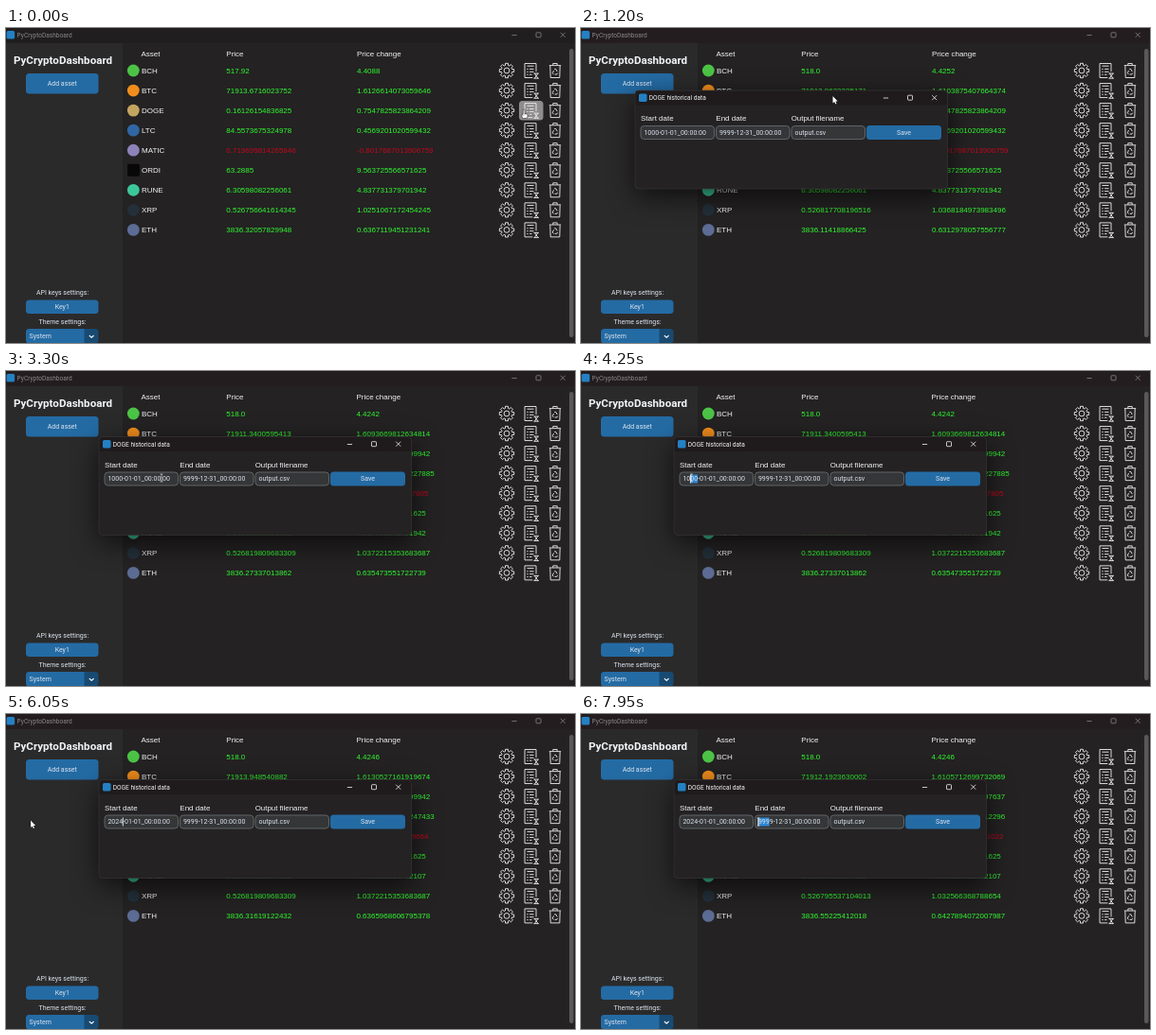
Animation, 600 px wide and 333 px high, one loop 8 s. Source, as an HTML page with a canvas:

```html
<!DOCTYPE html>
<html lang="en">
<head>
<meta charset="utf-8">
<title>PyCryptoDashboard</title>
<style>
html, body { margin: 0; width: 100%; height: 100%; overflow: hidden; background: #242223; }
canvas { display: block; width: 600px; height: 333px; }
</style>
</head>
<body>
<canvas id="stage"></canvas>
<script>
const W = 600, H = 333, LOOP = 8000;
const canvas = document.getElementById('stage');
const ctx = canvas.getContext('2d');
const dpr = Math.max(1, window.devicePixelRatio || 1);
canvas.width = W * dpr;
canvas.height = H * dpr;

const UI = 'Roboto, sans-serif';
const TABLE = '"Liberation Sans", Arial, sans-serif';
const BLUE = '#246ba4', WHITE = '#f2f4f6', GREEN = '#30fa30', RED = '#c0081c', DIM = '#8a8687';

// Each value is a list of [start time, text].
const ROWS = [
  { name: 'BCH', icon: '#4cc346',
    price: [[0, '517.92'], [700, '518.0']],
    change: [[0, '4.4088'], [700, '4.4252'], [2700, '4.4242'], [4300, '4.4246']] },
  { name: 'BTC', icon: '#f08d1c',
    price: [[0, '71913.6716023752'], [700, '71912.9623235171'], [1600, '71914.6614225621'],
      [2700, '71911.3400595413'], [4300, '71913.948540882'], [6200, '71913.9502232142'], [7400, '71912.1923630002']],
    change: [[0, '1.6126614073059646'], [700, '1.6103875407664374'], [1600, '1.614060004558271'],
      [2700, '1.6093669812634814'], [4300, '1.6130527161919674'], [6200, '1.613055093295621'], [7400, '1.6105712699732069']] },
  { name: 'DOGE', icon: '#c4a560',
    price: [[0, '0.16126154836825']],
    change: [[0, '0.7547825823864209'], [1600, '0.7541078523099942'], [7400, '0.7529163840297637']] },
  { name: 'LTC', icon: '#2f66a3',
    price: [[0, '84.5573675324978']],
    change: [[0, '0.4569201020599432'], [2700, '0.45702816340227885'], [4300, '0.45713902615247433'],
      [6200, '0.45724018362320926'], [7400, '0.4571860253912296']] },
  { name: 'MATIC', icon: '#8d83b8', down: true,
    price: [[0, '0.719699814265846']],
    change: [[0, '-0.8017687013906759'], [2700, '-0.801620438197805'], [4300, '-0.801573926499664'],
      [6200, '-0.801468135023621'], [7400, '-0.801530274681022']] },
  { name: 'ORDI', icon: '#080808', square: true,
    price: [[0, '63.2885']], change: [[0, '9.563725566571625']] },
  { name: 'RUNE', icon: '#3cc79a',
    price: [[0, '6.30598082256061'], [4300, '6.30606535104182']],
    change: [[0, '4.837731379701942'], [4300, '4.839123016702107']] },
  { name: 'XRP', icon: '#23303a',
    price: [[0, '0.526756641614345'], [700, '0.526817708196516'], [2700, '0.526819809683309'],
      [6200, '0.526819809615527'], [7400, '0.526795537104013']],
    change: [[0, '1.0251067172454245'], [700, '1.0368184973983496'], [2700, '1.0372215353683687'],
      [6200, '1.037221522368658'], [7400, '1.032566368788654']] },
  { name: 'ETH', icon: '#5c6c94',
    price: [[0, '3836.32057829948'], [700, '3836.11418866425'], [1600, '3836.19127218155'],
      [2700, '3836.27337013862'], [4300, '3836.31619122432'], [6200, '3836.4587764253'], [7400, '3836.55225412018']],
    change: [[0, '0.6367119451231241'], [700, '0.6312978057556777'], [1600, '0.633319907811002'],
      [2700, '0.635473551722739'], [4300, '0.6365968606795378'], [6200, '0.6403372430344039'], [7400, '0.6427894072007987']] }
];

const OPEN = 500;
const YEAR = [[0, '1000'], [5050, '2'], [5400, '20'], [5650, '202'], [5950, '2024']];
const POINTER = [[0, 546, 88], [480, 548, 88], [1000, 265.5, 72], [1200, 265.5, 72], [1550, 306.5, 75.5],
  [1900, 209, 118], [2300, 209, 118], [3000, 164, 113], [3500, 164, 113], [3950, 124, 113],
  [4150, 124, 113], [4750, 26, 112.5], [6100, 26, 112.5], [6650, 124, 113], [7100, 124, 113],
  [7500, 199, 114], [7650, 199, 114], [7900, 187, 114], [8000, 187, 114]];

const at = (steps, t) => steps.filter(s => s[0] <= t).pop()[1];
const ease = k => k * k * (3 - 2 * k);
const mix = (a, b, k) => a + (b - a) * k;

function follow(path, t) {
  const i = Math.max(1, path.findIndex(p => p[0] > t));
  const a = path[i - 1], b = path[i];
  const k = ease((t - a[0]) / (b[0] - a[0]));
  return { x: mix(a[1], b[1], k), y: mix(a[2], b[2], k) };
}

function text(str, x, y, size, font, color, align = 'left', weight = 400) {
  ctx.font = `${weight} ${size}px ${font}`;
  ctx.textAlign = align;
  ctx.fillStyle = color;
  ctx.fillText(str, x, y + size * 0.32);
}

function box(x, y, w, h, r, fill, stroke) {
  ctx.beginPath();
  ctx.roundRect(x, y, w, h, r);
  if (fill) { ctx.fillStyle = fill; ctx.fill(); }
  if (stroke) { ctx.strokeStyle = stroke; ctx.stroke(); }
}

function line(...pts) {
  ctx.beginPath();
  for (let i = 0; i < pts.length; i += 2) ctx.lineTo(pts[i], pts[i + 1]);
  ctx.stroke();
}

function button(label, x, y, w, h) {
  box(x, y, w, h, 3.5, BLUE);
  text(label, x + w / 2, y + h / 2, 7, UI, '#dce4ee', 'center');
}

function windowButtons(x, y, color) {
  ctx.strokeStyle = color;
  ctx.lineWidth = 0.8;
  line(x - 2.6, y + 0.3, x + 2.6, y + 0.3);
  box(x + 23, y - 2.5, 5, 5, 0.7, null, color);
  line(x + 48.7, y - 2.5, x + 53.7, y + 2.5);
  line(x + 53.7, y - 2.5, x + 48.7, y + 2.5);
}

function gear(x, y) {
  ctx.beginPath();
  for (let i = 0; i < 8; i++) {
    const a = i * Math.PI / 4;
    for (const [r, d] of [[5.7, -0.27], [7.8, -0.19], [7.8, 0.19], [5.7, 0.27]]) {
      ctx.lineTo(x + r * Math.cos(a + d), y + r * Math.sin(a + d));
    }
  }
  ctx.closePath();
  ctx.stroke();
  ctx.beginPath();
  ctx.arc(x, y, 2.9, 0, 7);
  ctx.stroke();
}

function report(x, y) {
  line(x + 1.8, y + 7.5, x - 6.5, y + 7.5, x - 6.5, y - 7.5, x + 5.5, y - 7.5, x + 5.5, y + 1);
  line(x - 4, y - 4.8, x + 3, y - 4.8);
  for (const dy of [-1.6, 1.3, 4.2]) {
    line(x - 4.2, y + dy, x - 2.8, y + dy);
    line(x - 1.4, y + dy, x + (dy > 2 ? 1 : 3), y + dy);
  }
  line(x + 3, y + 3, x + 8.3, y + 3);
  line(x + 3, y + 8.2, x + 8.3, y + 8.2);
  line(x + 3.8, y + 3, x + 7.5, y + 8.2);
  line(x + 7.5, y + 3, x + 3.8, y + 8.2);
}

function bin(x, y) {
  line(x - 6.2, y - 5.4, x + 6.2, y - 5.4);
  line(x - 2.2, y - 5.6, x - 2.2, y - 7.5, x + 2.2, y - 7.5, x + 2.2, y - 5.6);
  line(x - 5.2, y - 5, x - 4.8, y + 7.5, x + 4.8, y + 7.5, x + 5.2, y - 5);
  line(x - 0.8, y - 1.6, x + 0.8, y - 1.6, x + 2.2, y + 1);
  line(x + 2.6, y + 2.6, x + 1.8, y + 4, x - 0.3, y + 4);
  line(x - 1.6, y + 4, x - 2.7, y + 2.6, x - 1.5, y);
}

function sidebar() {
  ctx.fillStyle = '#2a2a2b';
  ctx.fillRect(0, 16, 123, H);
  text('PyCryptoDashboard', 60, 34.3, 11.6, UI, WHITE, 'center', 700);
  button('Add asset', 21, 48, 76.5, 21.5);
  text('API keys settings:', 59.5, 280, 7, UI, '#dce4ee', 'center');
  button('Key1', 21, 287.5, 76.5, 14.5);
  text('Theme settings:', 59.5, 310.5, 7, UI, '#dce4ee', 'center');
  box(21, 318, 76.5, 15.5, 3.5, '#184a72');
  box(21, 318, 61.5, 15.5, [3.5, 0, 0, 3.5], BLUE);
  text('System', 24.6, 326, 7, UI, '#dce4ee');
  ctx.strokeStyle = WHITE;
  ctx.lineWidth = 1.1;
  line(87.8, 325, 90.2, 327.2, 92.6, 325);
}

function table(t, pointer) {
  const priceX = 232.3, changeX = t < 2700 ? 370 : 369.4;
  text('Asset', 142.5, 27, 8, TABLE, WHITE);
  text('Price', priceX, 27, 8, TABLE, WHITE);
  text('Price change', changeX, 27, 8, TABLE, WHITE);
  ROWS.forEach((row, i) => {
    const y = 45 + i * 21.05;
    if (row.square) {
      box(128, y - 6.5, 13, 13, 2, row.icon);
    } else {
      ctx.beginPath();
      ctx.arc(134.3, y, 6.4, 0, 7);
      ctx.fillStyle = row.icon;
      ctx.fill();
    }
    const color = row.down ? RED : GREEN;
    text(row.name, 143, y, 8, TABLE, WHITE);
    text(at(row.price, t), priceX, y, 8, TABLE, color);
    text(at(row.change, t), changeX, y, 8, TABLE, color);
    const hover = Math.abs(pointer.x - 553.5) < 13 && Math.abs(pointer.y - y) < 10.5;
    if (hover) box(541, y - 10, 25.5, 20.5, 3.5, '#8e8c8d');
    ctx.strokeStyle = '#f0f0f0';
    ctx.lineWidth = 0.9;
    gear(528, y);
    report(553.5, y);
    bin(579, y);
  });
  box(594, 22, 4.5, 305, 2.2, '#5a5858');
}

function entry(x, y, str, sel) {
  ctx.lineWidth = 1;
  box(x + 0.5, y + 0.5, 77.5, 14, 3.5, '#343638', '#606467');
  const left = x + 3.9;
  ctx.font = `400 7px ${UI}`;
  const edge = n => left + ctx.measureText(str.slice(0, n)).width;
  if (sel && sel.to > sel.from) {
    ctx.fillStyle = '#2f86d2';
    ctx.fillRect(edge(sel.from), y + 3, edge(sel.to) - edge(sel.from), 9);
  }
  text(str, left, y + 7.4, 7, UI, '#dce4ee');
  if (sel && sel.caret) {
    ctx.fillStyle = '#eef3f8';
    ctx.fillRect(edge(sel.from) - 0.3, y + 3, 0.9, 9);
  }
}

// Characters between the pointer and the place where the drag began.
function dragged(x, left, anchor) {
  const from = Math.max(0, Math.min(anchor, Math.round((x - left) / 3.93)));
  return { from, to: anchor, caret: true };
}

function dialog(t, pointer) {
  const k = ease(Math.min(1, Math.max(0, (t - 1200) / 350)));
  const x = mix(57, 98, k), y = mix(66, 69.5, k);
  ctx.save();
  ctx.shadowColor = 'rgba(0,0,0,0.65)';
  ctx.shadowBlur = 28 * dpr;
  ctx.shadowOffsetY = 8 * dpr;
  box(x, y, 329.5, 104, 4, '#242223');
  ctx.restore();
  box(x, y, 329.5, 15.5, [4, 4, 0, 0], '#1f1b1c');
  ctx.lineWidth = 0.6;
  box(x, y, 329.5, 104, 4, null, '#3b3839');
  box(x + 4, y + 3.5, 8.5, 8.5, 1.5, '#2381c4');
  text('DOGE historical data', x + 14.8, y + 8, 6.55, UI, WHITE);
  windowButtons(x + 264.5, y + 7.7, WHITE);

  text('Start date', x + 6, y + 29.5, 8, TABLE, WHITE);
  text('End date', x + 85.3, y + 29.5, 8, TABLE, WHITE);
  text('Output filename', x + 164.7, y + 29.5, 7.9, TABLE, WHITE);

  const year = at(YEAR, t);
  let start = null, end = null;
  if (t >= 7600) end = dragged(pointer.x, x + 88.9, 3);
  else if (t >= 5050) start = { from: year.length, to: 0, caret: true };
  else if (t >= 4050) start = dragged(pointer.x, x + 9.4, 4);
  entry(x + 5.5, y + 37, year + '-01-01_00:00:00', start);
  entry(x + 85, y + 37, '9999-12-31_00:00:00', end);
  entry(x + 164.5, y + 37, 'output.csv');
  button('Save', x + 244, y + 37, 79, 15);
}

function arrow(x, y) {
  ctx.beginPath();
  for (const [a, b] of [[0, 0], [0, 7.4], [1.7, 5.9], [2.9, 8.5], [4, 8], [2.9, 5.5], [5.2, 5.4]]) ctx.lineTo(x + a, y + b);
  ctx.closePath();
  ctx.lineWidth = 0.8;
  ctx.strokeStyle = '#111';
  ctx.stroke();
  ctx.fillStyle = '#fff';
  ctx.fill();
}

function hand(x, y) {
  ctx.lineWidth = 0.6;
  box(x - 2, y + 2.5, 6, 5, 1.8, '#fff', '#222');
  box(x - 0.8, y - 2, 1.8, 6.5, 0.9, '#fff', '#222');
  ctx.fillStyle = '#fff';
  ctx.fillRect(x - 0.5, y + 2.8, 1.3, 3);
}

function beam(x, y) {
  ctx.strokeStyle = '#d8d8d8';
  ctx.lineWidth = 0.7;
  line(x, y - 4, x, y + 4);
  line(x - 1.4, y - 4, x + 1.4, y - 4);
  line(x - 1.4, y + 4, x + 1.4, y + 4);
}

function cursor(t, { x, y }) {
  const overEntry = t > 1550 && x > 104 && x < 342 && y > 106 && y < 122;
  if (x > 541 && x < 567) hand(x, y);
  else if (overEntry) beam(x, y);
  else arrow(x, y);
}

function draw(t) {
  ctx.setTransform(dpr, 0, 0, dpr, 0, 0);
  const pointer = follow(POINTER, t);
  ctx.fillStyle = '#242223';
  ctx.fillRect(0, 0, W, H);
  ctx.fillStyle = t < OPEN ? '#201e1f' : '#241d1f';
  ctx.fillRect(0, 0, W, 16);
  box(0.6, 3, 8.5, 8.5, 1.5, '#2381c4');
  text('PyCryptoDashboard', 11.6, 7.8, 6.55, UI, DIM);
  windowButtons(536, 7.3, DIM);
  sidebar();
  table(t, pointer);
  if (t >= OPEN) dialog(t, pointer);
  cursor(t, pointer);
}

const begin = performance.now();
function tick() {
  draw((performance.now() - begin) % LOOP);
  requestAnimationFrame(tick);
}
tick();
</script>
</body>
</html>
```
